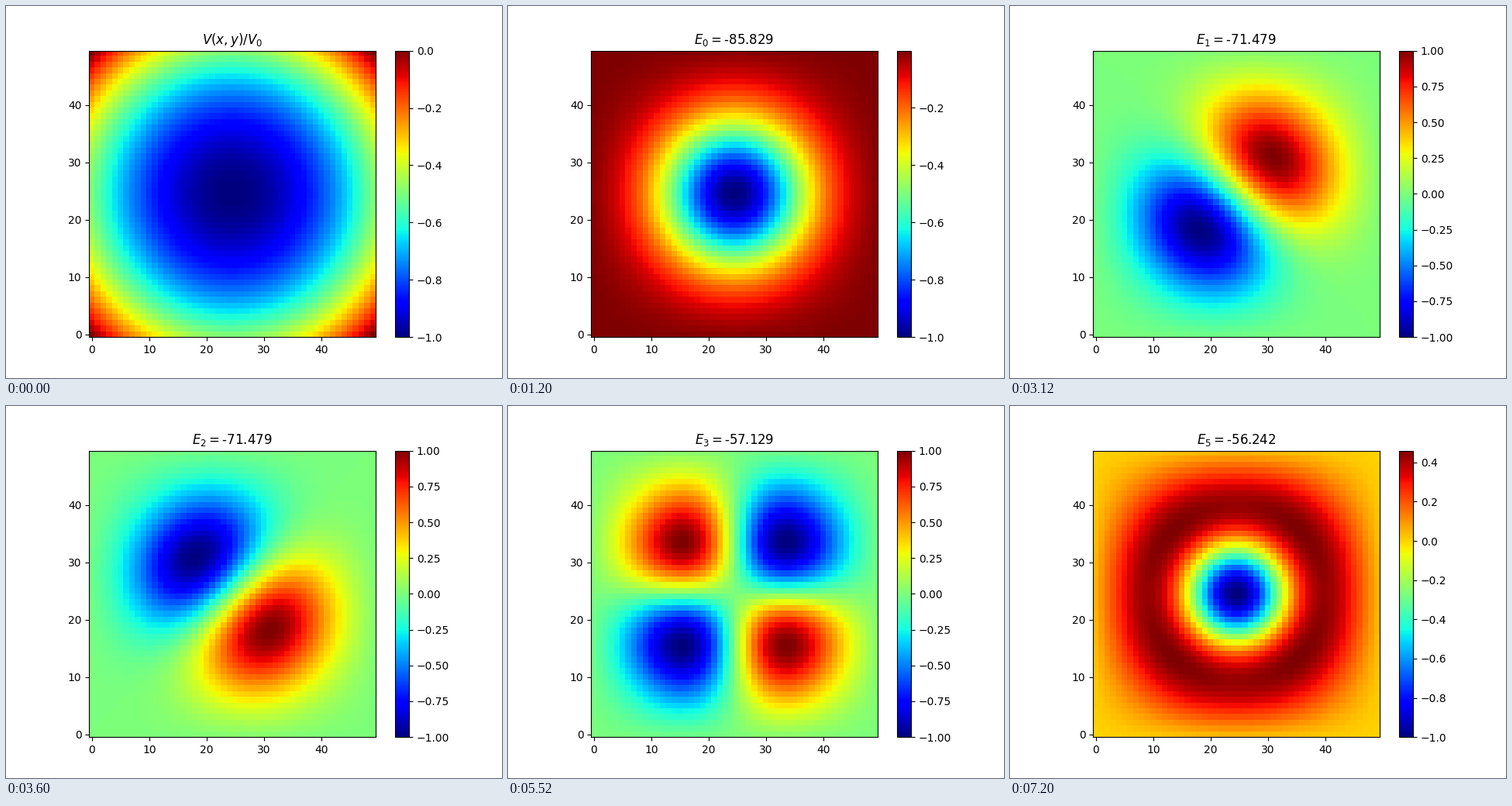
Recreate the animation shown at these times as a matplotlib script. Size 640 by 480 pixels, loop 8000 ms.

```python
import numpy as np
import matplotlib.pyplot as plt
from matplotlib.animation import FuncAnimation

N = 50
V0 = 100
STEP_MS = 400
STEPS_PER_STATE = 3
N_STEPS = 20

x = np.linspace(-1, 1, N)
h = x[1] - x[0]

# One-dimensional oscillator between hard walls; the 2D problem separates.
hopping = np.eye(N, k=1) + np.eye(N, k=-1)
hamiltonian = (2 * np.eye(N) - hopping) / h**2 + np.diag(V0 / 2 * x**2)
modes = np.linalg.eigh(hamiltonian)[1]
modes = modes * np.sign(modes[-1])


def product(nx, ny):
    return np.outer(modes[:, ny], modes[:, nx])


def normalise(field):
    return field / np.abs(field).max()


def level(n, energy, field):
    return f"$E_{n}=${energy:.3f}", normalise(field)


potential = (x[:, None]**2 + x[None, :]**2) / 2 - 1
states = [
    ("$V(x,y)/V_0$", normalise(potential)),
    level(0, -85.829, -product(0, 0)),
    level(1, -71.479, product(1, 0) + product(0, 1)),
    level(2, -71.479, product(1, 0) - product(0, 1)),
    level(3, -57.129, -product(1, 1)),
    level(4, -56.242, product(2, 0) - product(0, 2)),
    level(5, -56.242, product(2, 0) + product(0, 2)),
]

fig, ax = plt.subplots(figsize=(6.4, 4.8), dpi=100)
image = ax.imshow(states[0][1], cmap="jet", origin="lower")
fig.colorbar(image, ax=ax)
title = ax.set_title("")


def draw(step):
    label, field = states[step // STEPS_PER_STATE]
    title.set_text(label)
    image.set_data(field)
    # Rounding keeps the end ticks at exactly -1 and 1.
    image.set_clim(round(field.min(), 9), round(field.max(), 9))
    return image, title


anim = FuncAnimation(fig, draw, frames=N_STEPS, interval=STEP_MS,
                     init_func=lambda: draw(0), repeat=True, repeat_delay=0)
plt.show()
```
